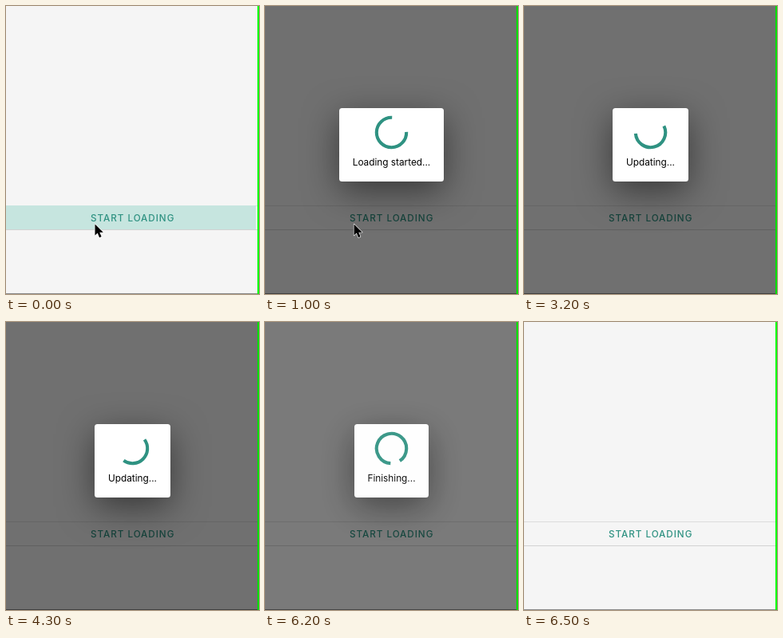
Animation, 317 px wide and 361 px high, one loop 6700 ms. Source, as an HTML page:

```html
<!DOCTYPE html>
<html lang="en">
<head>
<meta charset="utf-8">
<title>Loading dialog</title>
<style>
  html, body { margin: 0; width: 100%; height: 100%; overflow: hidden; background: #f5f5f5; }
  #stage {
    position: relative; width: 317px; height: 361px; overflow: hidden;
    background: #f5f5f5; font-family: Inter, "Liberation Sans", sans-serif;
    --teal: #2f9282;
  }
  #stage div, #stage svg { position: absolute; }
  .button {
    left: 0; top: 250px; width: 315px; height: 29px;
    border: solid #dcdcdc; border-width: 1px 0; border-bottom-color: #d2d2d2;
  }
  #press { left: 0; top: 250px; width: 313px; height: 30px; background: #c6e5df; }
  .label {
    left: 106px; top: 256px; line-height: 20px; white-space: nowrap;
    font-size: 11.7px; font-weight: 500; letter-spacing: .95px; color: var(--teal);
  }
  .floor { left: 0; top: 360px; width: 315px; height: 1px; background: #8c8c8c; }
  #modal { left: 0; top: 0; width: 315px; height: 361px; overflow: hidden; background: rgba(0, 0, 0, .54); }
  #dialog {
    top: 128px; height: 92px; border-radius: 3.5px; background: #fff;
    box-shadow: 0 12px 44px rgba(0, 0, 0, .5);
  }
  #message {
    left: 0; width: 317px; top: 186px; line-height: 20px; text-align: center;
    font-size: 11.8px; color: #000;
  }
  #spinner { left: 137px; top: 137px; }
  #arc { fill: none; stroke: var(--teal); stroke-width: 4.1; }
  .edge { left: 315px; top: 0; width: 2px; height: 361px; background: #0f0; }
  #shade { left: 315px; top: 0; width: 2px; height: 361px; background: rgba(0, 0, 0, .12); }
  #cursor { left: 110px; top: 272px; overflow: visible; }
</style>
</head>
<body>
<div id="stage">
  <div class="button"></div>
  <div id="press"></div>
  <div class="label">START LOADING</div>
  <div class="floor"></div>
  <div id="modal">
    <div id="dialog"></div>
    <svg id="spinner" width="43" height="43" viewBox="-21.5 -21.5 43 43"><path id="arc"/></svg>
    <div id="message"></div>
  </div>
  <div class="edge"></div>
  <div id="shade"></div>
  <svg id="cursor" width="14" height="20" viewBox="-1 -1 14 20">
    <path d="M.5 .5V14.6L3.7 11.6 6.1 17.2 8.6 16.1 6.3 10.7H10.8Z"
      fill="#000" stroke="#fff" stroke-width="1.2" stroke-linejoin="round" paint-order="stroke"/>
  </svg>
</div>
<script>
  const LOOP = 6700, STEP = 100, SPIN = 2400, SHOWN = 100, RADIUS = 18.7;
  const PHASES = [
    { from: 0, text: "Loading started...", width: 131 },
    { from: 3100, text: "Updating...", width: 95.5 },
    { from: 5100, text: "Finishing...", width: 93.5 }
  ];
  const el = id => document.getElementById(id);
  const [press, modal, dialog, message, arc, shade, cursor] =
    ["press", "modal", "dialog", "message", "arc", "shade", "cursor"].map(el);

  const ramp = (t, a, b) => Math.min(1, Math.max(0, (t - a) / (b - a)));
  const smooth = x => x * x * (3 - 2 * x);

  // Cubic bezier (.4, 0, .7, 1), solved by bisection
  function ease(x) {
    const curve = (s, a, b) => 3 * (1 - s) ** 2 * s * a + 3 * (1 - s) * s * s * b + s ** 3;
    let lo = 0, hi = 1;
    for (let i = 0; i < 24; i++) {
      const mid = (lo + hi) / 2;
      if (curve(mid, .4, .7) < x) lo = mid; else hi = mid;
    }
    return curve(lo, 0, 1);
  }

  function point(deg) {
    const a = deg * Math.PI / 180;
    return `${(RADIUS * Math.sin(a)).toFixed(3)} ${(-RADIUS * Math.cos(a)).toFixed(3)}`;
  }

  // The arc turns twice per cycle while it opens and closes around its middle
  function spin(t) {
    const p = Math.max(0, t - SHOWN) / SPIN;
    const half = 15 + 150 * ease(1 - Math.abs(1 - 2 * (p % 1)));
    const middle = 315 + 720 * p;
    arc.setAttribute("d",
      `M${point(middle - half)}A${RADIUS} ${RADIUS} 0 ${+(half > 90)} 1 ${point(middle + half)}`);
  }

  function draw(t) {
    const shown = smooth(ramp(t, 100, 400)) * (1 - smooth(ramp(t, 6150, 6450)));
    const phase = PHASES.filter(p => t >= p.from).pop();
    const leave = smooth(ramp(t, 1600, 2000));

    press.style.opacity = 1 - ramp(t, 0, 350);
    modal.style.opacity = shade.style.opacity = shown;
    dialog.style.width = phase.width + "px";
    dialog.style.left = 158.5 - phase.width / 2 + "px";
    message.textContent = phase.text;
    cursor.style.transform = `translate(${210 * leave}px, ${80 * leave}px)`;
    cursor.style.visibility = t < 2000 ? "visible" : "hidden";
    spin(t);
  }

  const start = performance.now();
  function tick() {
    const t = (performance.now() - start) % LOOP;
    draw(Math.floor(t / STEP) * STEP);
    requestAnimationFrame(tick);
  }
  draw(0);
  requestAnimationFrame(tick);
</script>
</body>
</html>
```
